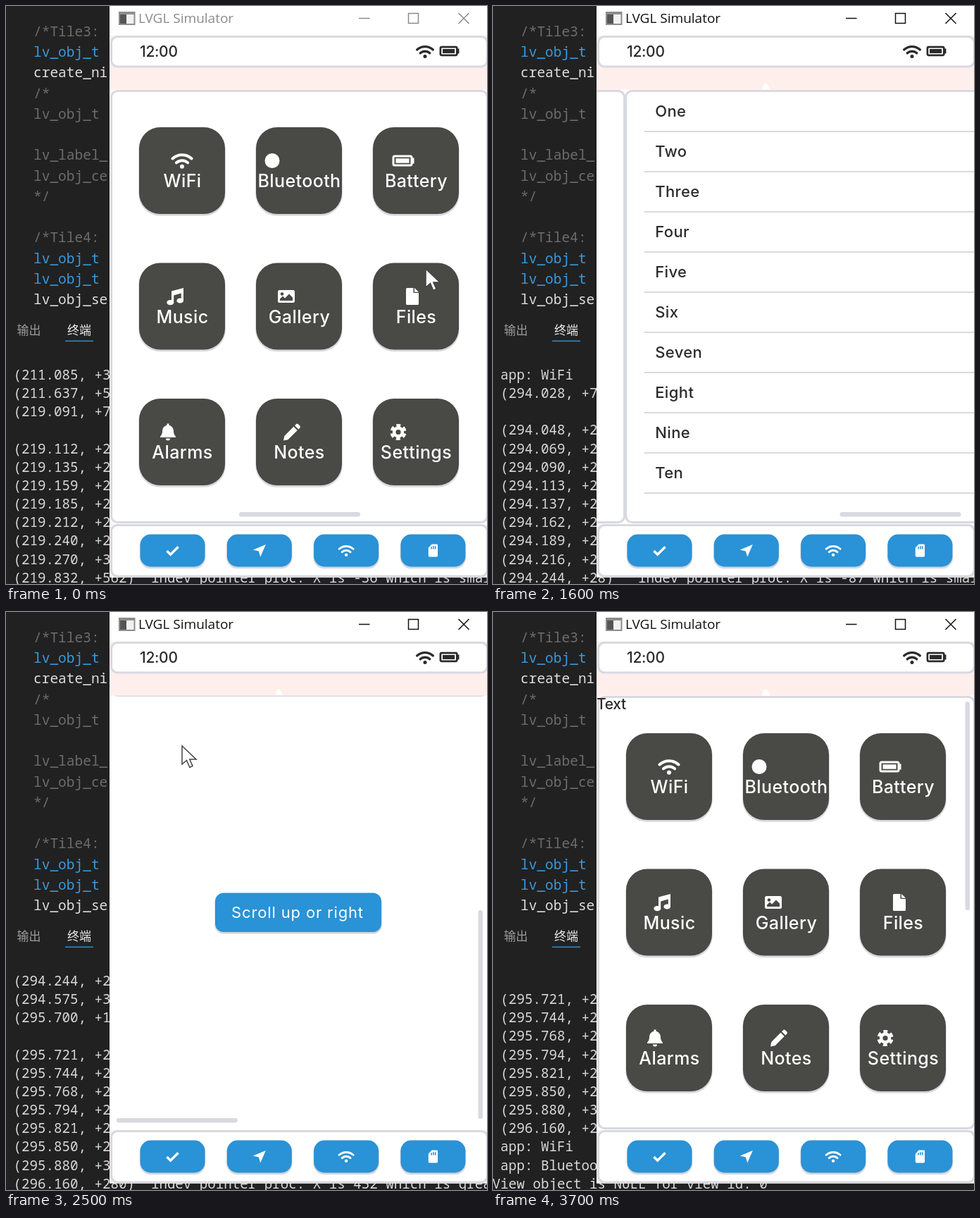
These frames come from a looping animation (683x820 px, 4100 ms). An HTML page:

```html
<!DOCTYPE html>
<html lang="en">
<head>
<meta charset="utf-8">
<style>
html, body { margin: 0; width: 100%; height: 100%; overflow: hidden; background: #212121; }
svg { display: block; width: 100%; height: 100%; }
text { white-space: pre; }
.mono { font: 19.17px "Noto Sans Mono", monospace; }
.code { font-size: 19.5px; }
.tab { font: 17px "Noto Sans CJK SC", "Noto Sans CJK", sans-serif; }
.title { font: 19px "Open Sans", sans-serif; }
.ui { font: 500 22px Inter, sans-serif; letter-spacing: .4px; }
.app { font-size: 25px; fill: #fff; text-anchor: middle; }
.hint { font-weight: 400; letter-spacing: .85px; text-anchor: middle; }
.small { font-size: 21px; letter-spacing: -.3px; }
.line { fill: none; stroke: currentColor; }
</style>
</head>
<body>
<svg id="stage" viewBox="0 0 683 820"></svg>
<script>
const LOOP = 4100, STEP = 100, TILE_W = 536, TILE_H = 614;
const EDGE = '#d9d9e1', DARK = '#494945', BLUE = '#2a92d6', INK = '#2b2b2b';

const rect = (x, y, w, h, r, fill, more = '') =>
  `<rect x="${x}" y="${y}" width="${w}" height="${h}" rx="${r}" fill="${fill}" ${more}/>`;
const text = (x, y, s, cls, fill = '#fff') => `<text x="${x}" y="${y}" class="${cls}" fill="${fill}">${s}</text>`;
const group = (x, y, s) => `<g transform="translate(${x} ${y})">${s}</g>`;
const panel = (y, h) => rect(149.5, y, 534, h, 9, '#fff', `stroke="${EDGE}" stroke-width="3.2"`);
const raised = (x, y, w, h, r, fill) =>
  rect(x, y + 2, w, h, r, '#d3d3d9', `stroke="${EDGE}" stroke-width="1.5"`) + rect(x, y, w, h, r, fill);

// Icons are centred on 0,0 and take the colour of their group.
const icon = {
  wifi: '<path class="line" stroke-width="4" stroke-linecap="round" d="M-13.5-3A20 20 0 0 1 13.5-3M-8 2.8A12 12 0 0 1 8 2.8"/><circle cy="8.3" r="3"/>',
  dot: '<circle r="10.5"/>',
  battery: '<rect class="line" x="-14" y="-6.5" width="26" height="13" rx="2" stroke-width="3"/><path d="M-10.5-3.2h19v6.4h-19zM12-4h3.5v8H12z"/>',
  music: '<path d="M-5-7.5L12-12V7H8.8V-4.5L-1.8-1.5V9H-5z"/><ellipse cx="-6.7" cy="8.6" rx="5" ry="3.6"/><ellipse cx="7.2" cy="6" rx="4.8" ry="3.6"/>',
  gallery: `<rect x="-12" y="-9" width="24" height="18" rx="2.5"/><g fill="${DARK}"><circle cx="-6" cy="-3.5" r="2.3"/><path d="M-9 6V3.5l4-4 3 3 6-6 5 5V6z"/></g>`,
  file: '<path d="M-9-10.5q0-1.5 1.5-1.5H1.5V-5H9v15.5q0 1.5-1.5 1.5h-15q-1.5 0-1.5-1.5zM3-12l6 5.7H3z"/>',
  bell: '<path d="M-1.5-12h3v2.2C6-8.8 8-5 8-1c0 5 3 6 3 8.5H-11C-11 5-8 4-8-1c0-4 2-7.8 6.5-8.8zM-3 9h6a3 3 0 0 1-6 0z"/>',
  pencil: '<path d="M-12 12l1.3-6.5L2.5-7.7l5.2 5.2L-5.5 10.7zM4-9.2l2-2q1.5-1.4 3 0l2.3 2.3q1.4 1.5 0 3l-2 2z"/>',
  gear: '<circle class="line" r="5.9" stroke-width="4.6"/><circle class="line" r="9.3" stroke-width="4.6" stroke-dasharray="5.6 4.14" transform="rotate(13)"/>',
  check: '<path class="line" stroke-width="3.6" d="M-8.5.5L-3 6 8.5-5.5"/>',
  arrow: '<path d="M9.5-9L1.5 9.5-1 1-9.5-1z"/>',
  card: `<path d="M-7-4l5-5.5H5.5q1.5 0 1.5 1.5V8q0 1.5-1.5 1.5h-11Q-7 9.5-7 8z"/><path class="line" color="${BLUE}" stroke-width="1.7" d="M-2.5-5.5v3.5M.5-6.5V-2M3.5-6.5V-2"/>`
};
const put = (name, x, y, color = '#fff', scale = 1) =>
  `<g transform="translate(${x} ${y}) scale(${scale})" fill="${color}" color="${color}">${icon[name]}</g>`;

const apps = [
  ['WiFi', 'wifi', 61], ['Bluetooth', 'dot', 23], ['Battery', 'battery', 43],
  ['Music', 'music', 51], ['Gallery', 'gallery', 43], ['Files', 'file', 56],
  ['Alarms', 'bell', 41], ['Notes', 'pencil', 51], ['Settings', 'gear', 36]
];
const grid = panel(120.5, 612) + apps.map(([name, glyph, dx], i) => {
  const x = 189 + i % 3 * 166, y = 172 + Math.floor(i / 3) * 192.5;
  return raised(x, y, 122, 123, 30, DARK) + put(glyph, x + dx, y + 47.5) + text(x + 61.5, y + 85, name, 'ui app');
}).join('');

const words = 'One Two Three Four Five Six Seven Eight Nine Ten'.split(' ');
const list = panel(120.5, 612) + words.map((w, i) =>
  text(191, 157 + i * 57, w, 'ui', INK) + rect(175.5, 177 + i * 57, 508, 2, 0, EDGE)).join('');

const hint = raised(297, 398.5, 236, 55.5, 12, BLUE) + text(414, 434, 'Scroll up or right', 'ui hint');
const upper = grid + text(147, 138, 'Text', 'ui small', INK);

const code = ['/*Tile3:', 'lv_obj_t', 'create_ni', '/*', 'lv_obj_t', '', 'lv_label_', 'lv_obj_ce', '*/', '',
  '/*Tile4:', 'lv_obj_t', 'lv_obj_t', 'lv_obj_se'];
const isComment = (s, i) => s.startsWith('/*') || i > code.indexOf('/*') && i <= code.indexOf('*/');
const editor = code.map((s, i) => text(39, 43 + i * 29.23, s, 'mono code',
    isComment(s, i) ? '#6c6c6c' : s === 'lv_obj_t' ? '#3a99dc' : '#dedede')).join('')
  + text(15.5, 466, '输出', 'tab', '#9b9b9b') + text(87, 466, '终端', 'tab', '#ececec')
  + rect(84, 474.5, 40, 1.6, 0, '#3088bd');

const frame = rect(147, 0, 536, 810.5, 0, '#fff') + rect(147, 42, 536, 768.5, 0, '#ffefec')
  + rect(160, 8, 23.5, 19, 0, '#8d8d8d') + rect(162, 12, 19.5, 13, 0, '#f1f1f1') + rect(162, 12, 9, 13, 0, '#555')
  + `<g id="caption">${text(188, 24, 'LVGL Simulator', 'title', 'currentColor')}
     <path class="line" stroke-width="1.5" d="M501 17.5h15.5M571.5 10.5h14v14h-14zM642.5 10l15 15M657.5 10l-15 15"/></g>`
  + panel(43.5, 42.5) + text(190, 72, '12:00', 'ui small', INK)
  + put('wifi', 595, 64.5, INK, .84) + put('battery', 629.5, 64, INK, .9)
  + rect(147, 118.5, 536, 617, 0, '#fff');

const dock = panel(736.5, 72.5) + ['check', 'arrow', 'wifi', 'card'].map((name, i) => {
  const x = 190.5 + i * 123.3;
  return raised(x, 749.5, 92, 46, 15, BLUE) + put(name, x + 46, 772.5, '#fff', name === 'wifi' ? .74 : .95);
}).join('');

// The log: each line knows when it appears; a drag prints a burst of ever slower stamps.
const log = [];
let before = 211082;
const say = (when, s) => log.push({ when, s });
function stamp(when, ms, why) {
  const head = `(${(ms / 1000).toFixed(3)}, +${ms - before})`;
  before = ms;
  say(when, head.padEnd(17) + 'indev pointer proc. X is ' + why);
}
function burst(when, length, start, span, count, pause, why) {
  stamp(when, start, why);
  say(when, '');
  for (let i = 1; i <= count; i++) {
    const u = i / count;
    stamp(when + length * u, Math.round(start + span * (.8 * u + .2 * u * u)), why);
  }
  stamp(when + length + STEP, before + pause, why);
}
stamp(0, 211085, '');
stamp(0, 211637, '');
burst(-STEP, 0, 219091, 179, 7, 562, '-36 which is smaller than zero');
say(600, 'app: Music');
say(800, 'app: WiFi');
burst(1400, 200, 294028, 216, 9, 331, '-87 which is smaller than zero');
burst(1800, 220, 295700, 180, 7, 280, '432 which is greater than hor. res');
say(2800, 'app: WiFi');
say(3000, 'app: Bluetooth');
say(3600, 'View object is NULL for view id: 0');

// Key points [time, x, y], joined with an ease-out.
const easeOut = u => 1 - (1 - u) ** 2;
function follow(keys, t) {
  const n = keys.findIndex(k => k[0] > t);
  if (n < 1) return keys[n ? keys.length - 1 : 0].slice(1);
  const a = keys[n - 1], b = keys[n], u = easeOut((t - a[0]) / (b[0] - a[0]));
  return [a[1] + (b[1] - a[1]) * u, a[2] + (b[2] - a[2]) * u];
}
const swipes = [[1330, 0, 0], [1700, -TILE_W, 0], [1800, -218, 0], [1900, -218, 0], [2000, 0, 0],
  [2300, 382, 0], [2500, TILE_W, 0], [2625, TILE_W, TILE_H]];
const tapTour = [[400, 596, 373], [600, 284, 390], [800, 258, 262], [900, 332, 540], [1000, 341, 497], [1100, 384, 109]];
const backTour = [[2300, 677, 590], [2500, 250, 190], [2700, 256, 326], [2800, 240, 258], [3000, 415, 262],
  [3100, 610, 433], [3300, 259, 749]];

const stage = document.getElementById('stage');
stage.innerHTML = `<defs><clipPath id="view">${rect(147.5, 118.5, 536, 616.5, 0, '#000')}</clipPath></defs>`
  + rect(0, 0, 683, 820, 0, '#212121') + editor + '<g id="log"></g>' + frame
  + `<path id="spot" d="M383 119q0-9 4-9.500q4 2 6.500 9.500z" fill="#fff"/><g clip-path="url(#view)"><g id="tiles">`
  + grid + group(TILE_W, 0, list) + group(-TILE_W, 0, hint) + group(-TILE_W, -TILE_H, upper) + '</g></g>'
  + rect(0, 718, 172, 6.5, 3.2, EDGE, 'id="barX"') + rect(670.5, 0, 6.5, 296, 3.2, EDGE, 'id="barY"') + dock
  + '<path id="pointer" d="M0 0V26L6.5 20.5 10.8 30.5 15 28.5 10.8 19H20z" fill="#fff" stroke="#444" stroke-width="1.5"/>';

const el = id => document.getElementById(id);
const set = (id, name, value) => el(id).setAttribute(name, value);
const move = (id, x, y) => set(id, 'transform', `translate(${x} ${y})`);
const show = (id, on) => set(id, 'visibility', on ? 'visible' : 'hidden');
const within = (t, a, b) => t >= a && t < b;

let shown = 0;
function draw(t) {
  const count = log.filter(l => l.when <= t).length;
  if (count !== shown) {
    el('log').innerHTML = log.slice(count - 12, count).map(({ s }, i) =>
      text(s.startsWith('View') ? -1 : 10.5, 530 + i * 26.15, s, 'mono', '#d8d8d8')).join('');
    shown = count;
  }
  set('caption', 'color', t < STEP ? '#8b8b8b' : '#111');
  show('spot', t >= 1400);

  const [dx, dy] = follow(swipes, t);
  const dragging = within(t, 1400, 1600) || within(t, 1800, 2400);
  move('tiles', dx, dy);
  move('barX', 331 - dx * .325, 0);
  move('barY', 0, 423 - dy * .482);
  for (const bar of ['barX', 'barY']) set(bar, 'fill', dragging ? '#a8a8a8' : EDGE);
  show('barX', dy === 0);
  show('barY', dx > 0);

  show('pointer', t < 1400 || within(t, 2300, 3600));
  move('pointer', ...follow(t < 1400 ? tapTour : backTour, t));
}

const start = performance.now();
function tick() {
  const t = (performance.now() - start) % LOOP;
  draw(Math.floor(t / STEP) * STEP);
  requestAnimationFrame(tick);
}
tick();
</script>
</body>
</html>
```
